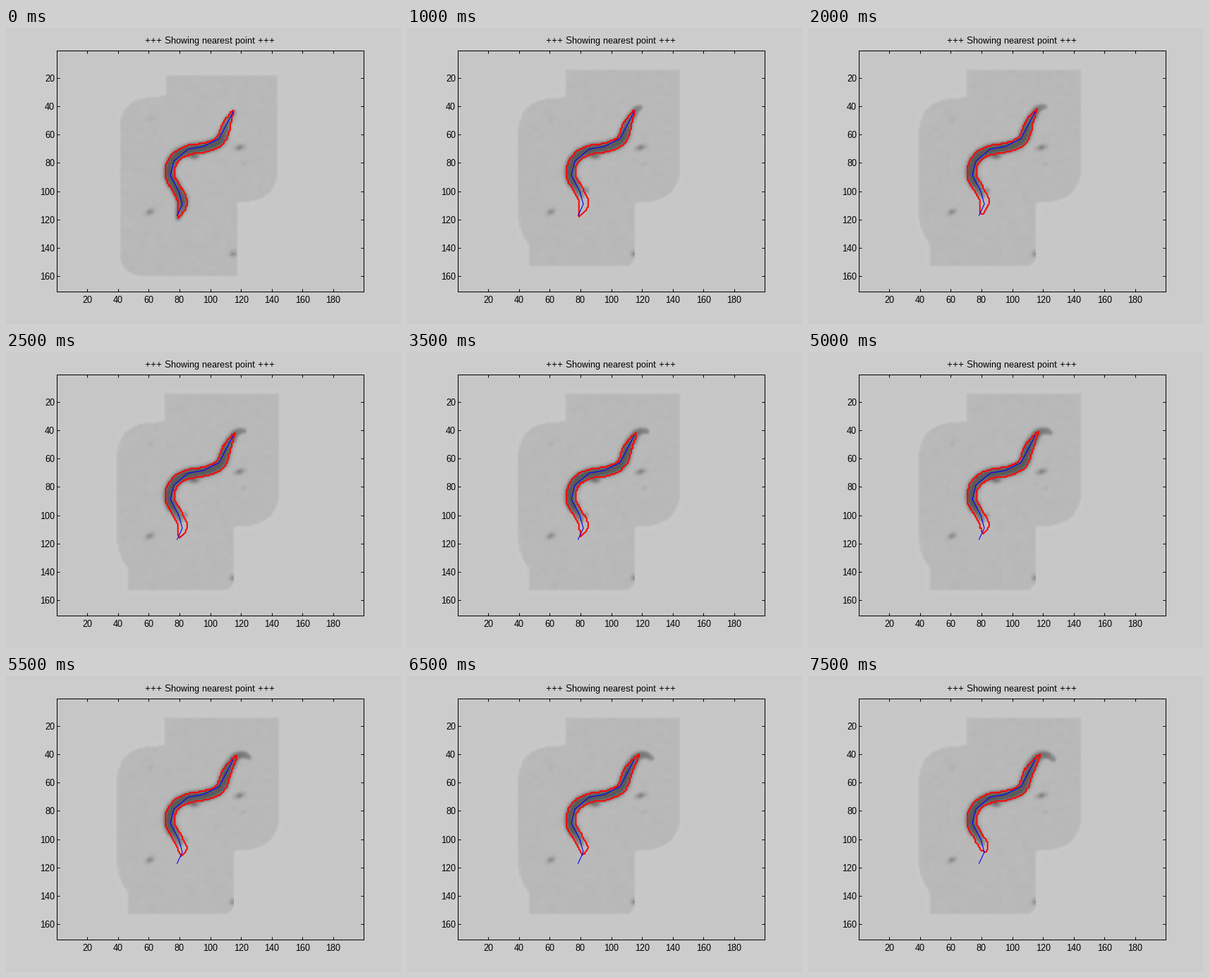
A matplotlib script for the animation above (8 s loop, 560 px wide and 420 px high).

```python
import numpy as np
import matplotlib.pyplot as plt
from matplotlib.animation import FuncAnimation
from matplotlib.path import Path

plt.rcParams.update({"text.hinting": "native", "text.hinting_factor": 1})

W, H, DPI = 560, 420, 100
LEFT, TOP, RIGHT, BOTTOM = 72.45, 31.52, 506.6, 373.6
COLS, ROWS = 199, 170
FRAMES, INTERVAL = 16, 500
SX, SY = (RIGHT - LEFT) / COLS, (BOTTOM - TOP) / ROWS
PX = 72 / DPI

rng = np.random.default_rng(4)
gx, gy = np.meshgrid(LEFT + (np.arange(COLS) + 0.5) * SX,
                     TOP + (np.arange(ROWS) + 0.5) * SY)

# Pixel positions from head to tail.
MIDLINE = [(322, 119), (302, 157), (280, 168), (258, 172), (238, 189),
           (233, 209), (245, 232), (250, 250), (242.5, 266)]
SPINE = [(313, 136), (304, 159), (284, 169), (260, 173), (242, 182),
         (233, 197), (233, 212), (243, 230), (250, 247), (244, 270)]


def smooth(pts, n=10):
    """Catmull-Rom curve through the points."""
    p = np.asarray(pts, float)
    p = np.vstack([2 * p[0] - p[1], p, 2 * p[-1] - p[-2]])
    t = np.linspace(0, 1, n, endpoint=False)[:, None]
    out = []
    for a, b, c, d in zip(p, p[1:], p[2:], p[3:]):
        out.append(0.5 * (2 * b + (c - a) * t + (2 * a - 5 * b + 4 * c - d) * t**2
                          + (3 * b - a - 3 * c + d) * t**3))
    return np.vstack(out + [p[-2:-1]])


def resample(curve, cut=0.0, step=2.0):
    """Even spacing along the curve, with `cut` pixels removed from its end."""
    s = np.r_[0, np.cumsum(np.hypot(*np.diff(curve, axis=0).T))]
    t = np.linspace(0, s[-1] - cut, int((s[-1] - cut) / step))
    return t, np.column_stack([np.interp(t, s, c) for c in curve.T])


def taper(s, head, tail):
    return np.minimum(s / head, (s[-1] - s) / tail).clip(0, 1) ** 0.7


def to_data(pts):
    p = np.asarray(pts, float)
    return np.column_stack([(p[:, 0] - LEFT) / SX + 0.5, (p[:, 1] - TOP) / SY + 0.5])


def rounded(corners):
    """Polygon from (x, y, radius) corners."""
    c = np.array(corners, float)
    xy, t = c[:, :2], np.linspace(0, 1, 12)[:, None]
    out = []
    for prev, p, nxt, r in zip(np.roll(xy, 1, 0), xy, np.roll(xy, -1, 0), c[:, 2]):
        a = p + r * (prev - p) / np.hypot(*(prev - p))
        b = p + r * (nxt - p) / np.hypot(*(nxt - p))
        out.append((1 - t) ** 2 * a + 2 * t * (1 - t) * p + t**2 * b)
    return np.vstack(out)


def blur(a, times):
    for _ in range(times):
        a = np.pad(a, 1, mode="edge")
        a = (a[:-2] + 2 * a[1:-1] + a[2:]) / 4
        a = (a[:, :-2] + 2 * a[:, 1:-1] + a[:, 2:]) / 4
    return a


def spot(x, y, rx, ry, depth, tilt=0.0):
    c, s = np.cos(tilt), np.sin(tilt)
    u, v = (gx - x) * c + (gy - y) * s, (gy - y) * c - (gx - x) * s
    return depth * np.exp(-(u / rx) ** 2 - (v / ry) ** 2)


def plate(corners):
    """Grey plate with a faint bright rim, soft mottling and specks."""
    grid = np.column_stack([gx.ravel(), gy.ravel()])
    mask = Path(rounded(corners)).contains_points(grid).reshape(gx.shape).astype(float)
    grain = blur(rng.normal(size=gx.shape), 3)
    grain *= 0.8 / grain.std()
    img = 198 + 7 * blur(mask, 14) * (1 - mask) + (grain - 14) * blur(mask, 1)
    img -= spot(331, 170, 7, 4, 52, -0.25) + spot(204, 261, 6, 4, 46, -0.5)
    img -= spot(322, 320, 5, 4, 42) * mask + spot(267, 183, 7, 4, 55)
    img -= spot(205, 130, 5, 4, 7, -0.6) + spot(337, 193, 4, 3, 8)
    return img


first_plate = plate([(228, 67, 0), (385, 67, 0), (385, 244, 46), (328, 247, 0),
                     (328, 352, 0), (161, 352, 38), (161, 102, 42), (228, 96, 0)])
main_plate = plate([(226, 59, 0), (387, 59, 0), (387, 243, 48), (324, 248, 0),
                    (324, 338, 20), (173, 338, 0), (173, 308, 0), (158, 282, 18),
                    (158, 104, 46), (226, 98, 0)])


def contour(p):
    """Outline whose tip creeps forward while its tail draws in."""
    tip = (322 + 7 * p, 117 - 6 * p)
    s, c = resample(smooth([tip, *SPINE]), cut=20 * p)
    tx, ty = np.gradient(c, axis=0).T
    normal = np.column_stack([-ty, tx]) / np.hypot(tx, ty)[:, None]
    offset = normal * (6.5 * taper(s, 28, 18 - 10 * p))[:, None]
    return np.round(to_data(np.vstack([c + offset, (c - offset)[::-1]])))


def picture(i):
    start = i == 0
    sweep = np.radians(np.linspace(150, 150 - 115 * np.sqrt(i / (FRAMES - 1)), 20))
    head = np.column_stack([335 + 15 * np.cos(sweep), 127 - 15 * np.sin(sweep)])
    body = smooth([head[0], *SPINE])
    s, c = resample(np.vstack([head[:0:-1], body]), cut=0 if start else 33)
    t = taper(s, 45, 24)
    dark = np.zeros(gx.shape)
    for (x, y), k in zip(c, t):
        d2 = ((gx - x) ** 2 + (gy - y) ** 2) / (4 + 4.6 * k) ** 2
        dark = np.maximum(dark, (45 + 50 * k) * np.exp(-d2 ** 1.5))
    if start:
        return first_plate - dark
    curl = spot(253, 230 + 0.2 * i, 4.5, 5, 52 - 2 * i)
    return main_plate - np.maximum(dark, curl)


fig = plt.figure(figsize=(W / DPI, H / DPI), dpi=DPI, facecolor="#cccccc")
ax = fig.add_axes([LEFT / W, 1 - BOTTOM / H, (RIGHT - LEFT) / W, (BOTTOM - TOP) / H])
image = ax.imshow(main_plate, cmap="gray", vmin=0, vmax=255, aspect="auto",
                  interpolation="nearest", extent=(0.5, COLS + 0.5, ROWS + 0.5, 0.5))
edge, = ax.plot([], [], color="#ff0000", lw=2 * PX, solid_joinstyle="round")
ax.plot(*to_data(MIDLINE).T, color="#0000ff", lw=1.1 * PX)
ax.set(xlim=(0.5, COLS + 0.5), ylim=(ROWS + 0.5, 0.5),
       xticks=range(20, 181, 20), yticks=range(20, 161, 20))
ax.tick_params(direction="in", length=4 * PX, width=PX, top=True, right=True,
               labelbottom=False, labelleft=False)
for side in ax.spines.values():
    side.set_linewidth(PX)


def label(x, y, text, ha="center"):
    fig.text(x / W, 1 - y / H, text, ha=ha, va="baseline", color="black",
             family="Liberation Sans", size=13 * PX)


label(289, 22, "+++ Showing nearest point +++")
for v in range(20, 181, 20):
    label(LEFT + (v - 0.5) * SX, 390, str(v))
for v in range(20, 161, 20):
    label(69, TOP + (v - 0.5) * SY + 4.8, str(v), ha="right")


def draw(i):
    image.set_data(picture(i))
    edge.set_data(*contour(i / (FRAMES - 1)).T)
    return image, edge


anim = FuncAnimation(fig, draw, frames=FRAMES, interval=INTERVAL,
                     repeat=True, repeat_delay=0)
plt.show()
```
